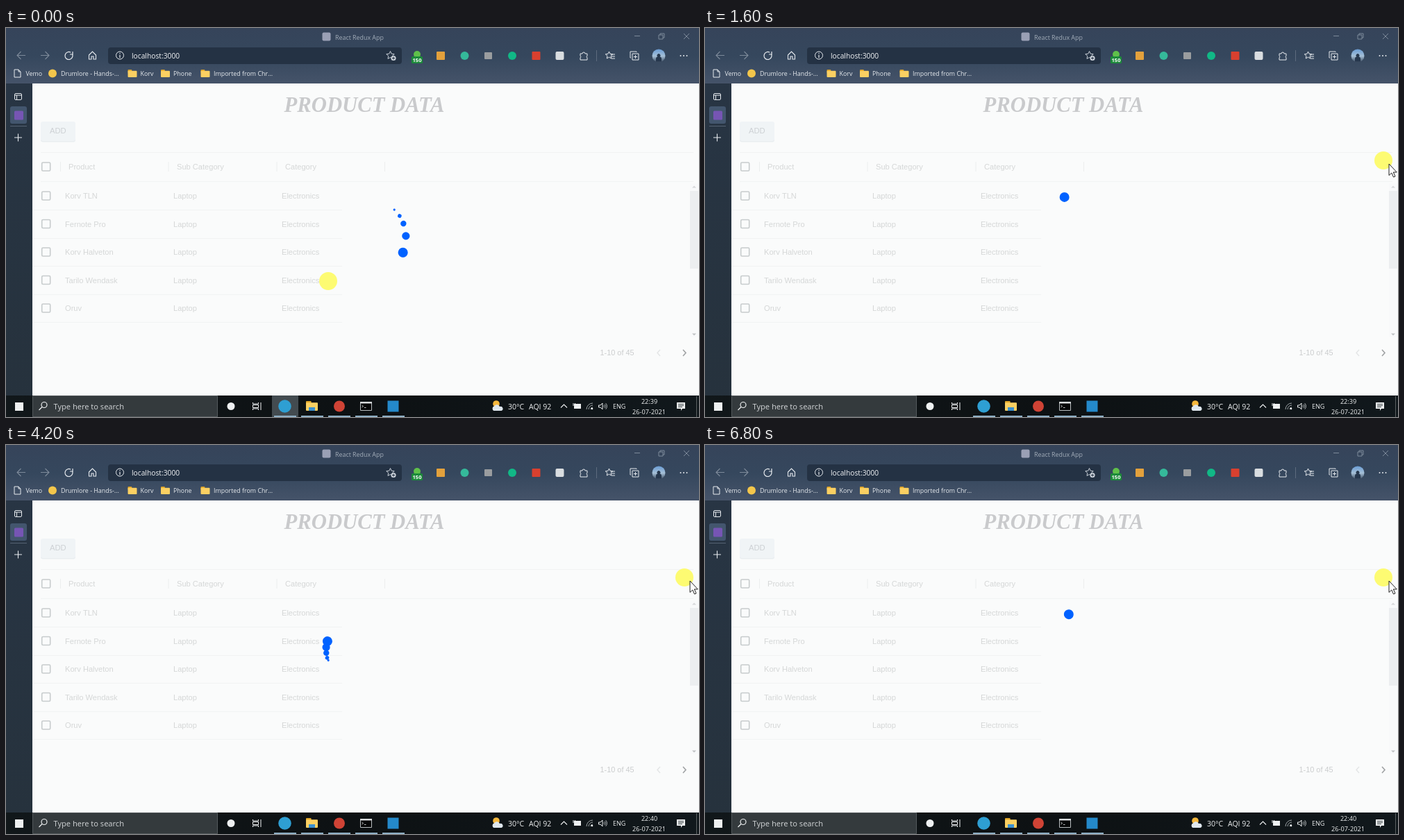
An HTML page with a canvas for the animation above (7000 ms loop, 998 by 561 pixels).

```html
<!DOCTYPE html>
<html lang="en">
<head>
<meta charset="utf-8">
<title>Product data</title>
<style>
  html, body { margin: 0; width: 100%; height: 100%; overflow: hidden; background: #fafbfc; }
  canvas { display: block; width: 998px; height: 561px; }
</style>
</head>
<body>
<canvas id="stage" width="998" height="561"></canvas>
<script>
const ctx = document.getElementById('stage').getContext('2d');
const LOOP = 7000, STEP = 200, SPIN = 1700;
const UI = '"Open Sans", "Noto Sans", sans-serif';
const SANS = '"Liberation Sans", Arial, sans-serif';
const SERIF = '"Liberation Serif", "Times New Roman", serif';

function rect(x, y, w, h, color, r = 0) {
  ctx.fillStyle = color;
  ctx.beginPath();
  ctx.roundRect(x, y, w, h, r);
  ctx.fill();
}

function frame(x, y, w, h, color, r = 0, width = 1) {
  ctx.strokeStyle = color;
  ctx.lineWidth = width;
  ctx.beginPath();
  ctx.roundRect(x, y, w, h, r);
  ctx.stroke();
}

function dot(x, y, r, color) {
  ctx.fillStyle = color;
  ctx.beginPath();
  ctx.arc(x, y, r, 0, Math.PI * 2);
  ctx.fill();
}

function arc(x, y, r, color, from = 0, to = Math.PI * 2, width = 1) {
  ctx.strokeStyle = color;
  ctx.lineWidth = width;
  ctx.beginPath();
  ctx.arc(x, y, r, from, to);
  ctx.stroke();
}

// Path strings are relative to (x, y).
function path(x, y, d, { stroke, fill, width = 1 } = {}) {
  ctx.save();
  ctx.translate(x, y);
  const p = new Path2D(d);
  if (fill) { ctx.fillStyle = fill; ctx.fill(p); }
  if (stroke) { ctx.strokeStyle = stroke; ctx.lineWidth = width; ctx.stroke(p); }
  ctx.restore();
}

function text(str, x, y, size, color, { font = UI, style = '', align = 'left' } = {}) {
  ctx.font = `${style} ${size}px ${font}`;
  ctx.fillStyle = color;
  ctx.textAlign = align;
  ctx.fillText(str, x, y);
}

function gradient(x0, y0, x1, y1, ...colors) {
  const g = ctx.createLinearGradient(x0, y0, x1, y1);
  colors.forEach((c, i) => g.addColorStop(i / (colors.length - 1), c));
  return g;
}

function folder(x, y, w, h) {
  rect(x, y, w * 0.45, h * 0.4, '#e0a526', 1);
  rect(x, y + h * 0.16, w, h * 0.84, '#fbd062', 1);
}

function star(x, y, r, color) {
  ctx.beginPath();
  for (let i = 0; i < 10; i++) {
    const a = i * Math.PI / 5, d = i % 2 ? r * 0.48 : r;
    ctx.lineTo(x + d * Math.sin(a), y - d * Math.cos(a));
  }
  ctx.closePath();
  ctx.strokeStyle = color;
  ctx.lineWidth = 1;
  ctx.stroke();
}

function drawBrowser() {
  const ink = '#e6eaee', dim = '#7d8a9a';
  rect(0, 0, 998, 80, gradient(0, 0, 0, 80, '#36445a', '#35475d', '#455369'));

  rect(455.5, 6.5, 12, 12, '#9aa0b5', 2);
  text('React Redux App', 474, 17, 8.9, '#a3adb9');
  path(905, 11.5, 'M0 0H8', { stroke: dim });
  path(940, 8, 'M0 2H6V8H0ZM2 2V0H8V6H6', { stroke: dim });
  path(976, 8, 'M0 0L8 8M8 0L0 8', { stroke: dim });

  path(16, 39.5, 'M12 0H0M5.5-5.5L0 0L5.5 5.5', { stroke: dim, width: 1.1 });
  path(50, 39.5, 'M0 0H12M6.5-5.5L12 0L6.5 5.5', { stroke: dim, width: 1.1 });
  arc(90.5, 40, 5.5, ink, -0.4, 5.2, 1.2);
  path(96, 34, 'M0 0V4H-4', { stroke: ink, width: 1.2 });
  path(119.5, 34, 'M0 5L5 0L10 5V11H6.5V7H3.5V11H0Z', { stroke: ink, width: 1.1 });

  rect(147, 28, 423, 24, '#243244', 4);
  arc(164, 39.5, 5.5, ink);
  path(164, 36, 'M0 0V1.2M0 2.8V7', { stroke: ink, width: 1.2 });
  text('localhost:3000', 181, 43.5, 10.25, '#f2f4f6');
  star(553.5, 39.5, 6, '#c9d0d8');
  dot(558, 43.5, 3.6, '#c9d0d8');
  path(558, 43.5, 'M-2 0H2M0-2V2', { stroke: '#243244' });

  dot(592, 38, 5, '#5fc04a');
  rect(584, 41, 16, 10, '#1c8a3a', 1.5);
  text('150', 592, 49.3, 7.5, '#fff', { style: 'bold', align: 'center' });
  rect(620, 34, 12, 12, '#e3a13c', 1);
  dot(660.5, 40, 6, '#35b99a');
  rect(689, 35, 11, 10, '#9a9d9f', 1);
  dot(729, 40, 6, '#11b886');
  rect(757.5, 34, 12, 12, '#d8402f', 1);
  rect(791.5, 34, 12, 12, '#d9dde0', 2);
  path(827, 35, 'M0 2H3A2 2 0 0 1 7 2H10V5A2 2 0 0 0 10 8V11H0V8A2 2 0 0 0 0 5Z', { stroke: ink });
  path(850.5, 32, 'M0 0V16', { stroke: '#5d6b7e' });
  star(868.5, 39.5, 5.5, ink);
  path(871, 38, 'M0 0H6M1 3H6M1 6H6', { stroke: ink });
  path(899, 34, 'M3 3H12V12H3ZM1 9H0V0H9V1M7.5 5V10M5 7.5H10', { stroke: ink });

  dot(940, 40, 9.5, gradient(0, 31, 0, 50, '#6d9fd5', '#a5bfd6', '#344357'));
  path(940, 48.5, 'M-4 0V-4Q-4-7-1.5-7A2.4 2.4 0 1 1 1.5-7Q4-7 4-4V0Z', { fill: '#26374d' });
  [971.5, 976, 980.5].forEach(x => dot(x, 40, 1, ink));

  path(12, 60, 'M0 0H6L9 3V11H0ZM6 0V3H9', { stroke: ink });
  text('Vemo', 28.5, 69, 8.9, ink);
  dot(67, 65.5, 6, '#f3c64b');
  text('Drumlore - Hands-...', 79, 69, 8.9, ink);
  folder(175.5, 60, 13, 11);
  text('Korv', 193.5, 69, 8.9, ink);
  folder(223, 60, 13, 11);
  text('Phone', 241, 69, 8.9, ink);
  folder(280.5, 60, 13, 11);
  text('Imported from Chr...', 299, 69, 8.9, ink);

  rect(0, 80, 38, 450, gradient(0, 80, 0, 530, '#283544', '#26323d'));
  frame(12.5, 94.5, 10, 9, ink, 1.5);
  path(12.5, 97, 'M0 0H10M3 0V6.5', { stroke: ink });
  rect(6, 113, 24, 25, '#43566e', 3);
  rect(12, 119.5, 13, 13, '#7655b4', 1.5);
  path(6, 141.5, 'M0 0H24', { stroke: '#566373' });
  path(17.5, 158, 'M-5.5 0H5.5M0-5.5V5.5', { stroke: ink, width: 1.1 });
}

function drawPage() {
  const ink = '#d5d7d7', line = '#f1f3f3';
  rect(38, 80, 960, 450, '#fafbfb');
  text('PRODUCT DATA', 400.5, 121.3, 30.7, '#c9cacc', { font: SERIF, style: 'italic bold' });

  rect(50, 136, 50, 28.5, '#e9edf0', 3);
  rect(50, 135, 50, 28, '#f0f4f6', 3);
  text('ADD', 63, 152, 11.2, '#cdd1d4', { font: SANS });

  const cell = (str, x, y) => text(str, x, y + 4, 11.1, ink, { font: SANS });
  const box = y => frame(51.7, y - 6, 12, 12, '#c7cccd', 1.5, 1.6);
  path(50, 179.5, 'M0 0H940M0 42H940', { stroke: line });
  box(200);
  ['Product', 'Sub Category', 'Category'].forEach((name, i) => cell(name, 90 + i * 156, 200));
  [78.5, 234, 390, 545.5].forEach(x => path(x, 193, 'M0 0V14', { stroke: '#eceeee' }));

  ['Korv TLN', 'Fernote Pro', 'Korv Halveton', 'Tarilo Wendask', 'Oruv'].forEach((name, i) => {
    const y = 242 + i * 40.5;
    box(y);
    cell(name, 85, y);
    cell('Laptop', 241, y);
    cell('Electronics', 397, y);
    path(38, Math.round(y + 20) + 0.5, 'M0 0H446', { stroke: line });
  });

  rect(985, 224, 12, 222, '#f8f9fa');
  rect(985, 235, 12, 112, '#eceef0');
  path(991, 229, 'M-3 1.5L0-1.5L3 1.5Z', { fill: '#d5d7d9' });
  path(991, 442, 'M-3-1.5L0 1.5L3-1.5Z', { fill: '#bfc1c3' });

  text('1-10 of 45', 855.5, 472, 10.9, '#cbcdce', { font: SANS });
  path(942, 464, 'M0 0L-4 4.5L0 9', { stroke: '#e3e5e6', width: 1.4 });
  path(975, 464, 'M0 0L4 4.5L0 9', { stroke: '#9fa2a4', width: 1.6 });
}

function drawTaskbar(t) {
  const ink = '#eef0f1';
  rect(0, 530, 998, 31, gradient(0, 0, 998, 0, '#11171a', '#0d1113', '#11181c'));
  rect(13, 540, 12, 12, ink);
  rect(38, 530, 267, 31, '#343a3d');
  frame(38.5, 530.5, 266, 30, '#53595c');
  arc(55, 543.5, 4, ink, 0, Math.PI * 2, 1.2);
  path(52, 546.5, 'M0 0L-4.5 4.5', { stroke: ink, width: 1.2 });
  text('Type here to search', 68.5, 550, 11.1, '#d3d6d8');
  dot(324, 545.5, 5.5, ink);
  path(355.5, 540, 'M0 0V2H8V0M0 11V9H8V11M0 3.5H8V7.5H0ZM11.5 0V11', { stroke: ink });

  if (t < STEP) rect(383, 530, 38, 31, '#434b50');
  for (let i = 0; i < 5; i++) rect(386 + i * 39, 559, 32, 2, '#8fb0c6');
  dot(401.5, 545.5, 9.3, '#2e9fd3');
  folder(432, 538, 17, 14);
  rect(436, 547, 9, 5, '#3c91d0');
  dot(480, 545.5, 8, '#cf4335');
  rect(510, 539, 17, 13, '#050607');
  frame(510.5, 539.5, 16, 12, '#b9bec0');
  rect(510, 539, 17, 2.5, '#d8dbdc');
  path(512.5, 544, 'M0 0L2 1.5L0 3M3.5 3.5H6', { stroke: ink, width: 0.8 });
  rect(549.5, 537.5, 16, 16, '#2489ca');

  dot(706, 542, 4.8, '#f6b83d');
  path(700, 552, 'M2.5 0A3.5 3.5 0 0 1 3-6.5A4.5 4.5 0 0 1 11-6A3.2 3.2 0 0 1 13.5 0Z', { fill: '#dfe7ee' });
  text('30°C', 723, 550, 10.5, ink);
  text('AQI 92', 753, 550, 10.5, ink);
  path(799, 547.5, 'M0 0L4.5-4.5L9 0', { stroke: ink, width: 1.1 });
  rect(818, 542, 10, 7, ink);
  path(817, 541, 'M0 0V4M2.5 0V4', { stroke: ink });
  [3, 6, 9].forEach(r => arc(845, 550, r, '#9ea4a7', Math.PI, Math.PI * 1.5));
  dot(844, 549, 1.3, ink);
  path(853.5, 545.5, 'M0-1.5H2.5L5.5-4.5V4.5L2.5 1.5H0Z', { stroke: ink });
  [2, 4, 6].forEach(r => arc(859.5, 545.5, r, '#aeb3b5', -0.8, 0.8));
  text('ENG', 874, 549, 9, ink);
  text(t < 4000 ? '22:39' : '22:40', 926.5, 542, 9.1, ink, { align: 'center' });
  text('26-07-2021', 926, 556.5, 9.2, ink, { align: 'center' });
  path(966, 540, 'M0 0H12V9H8L6 12V9H0Z', { fill: ink });
  path(968, 542.5, 'M0 0H8M0 2H8M0 4H6', { stroke: '#20272b', width: 0.8 });
  path(994.5, 531, 'M0 0V30', { stroke: '#5c6163' });
}

// CSS "ease": cubic-bezier(.25, .1, .25, 1)
function ease(x) {
  let lo = 0, hi = 1;
  for (let i = 0; i < 24; i++) {
    const s = (lo + hi) / 2;
    if (0.75 * s - 0.75 * s * s + s ** 3 < x) lo = s; else hi = s;
  }
  return 0.3 * lo + 2.4 * lo * lo - 1.7 * lo ** 3;
}

const mix = (a, b, k) => a + (b - a) * k;

// Tail dot positions in em, for the folded, short, long and full tail.
const FOLDED = Array.from({ length: 4 }, () => [0, -0.83]);
const SHORT = [[-0.087, -0.825], [-0.173, -0.812], [-0.256, -0.789], [-0.297, -0.775]];
const LONG = [[-0.338, -0.758], [-0.555, -0.617], [-0.671, -0.488], [-0.749, -0.34]];
const FULL = [[-0.377, -0.74], [-0.645, -0.522], [-0.775, -0.297], [-0.82, -0.09]];
const TAIL = [[0, FOLDED], [0.05, FOLDED], [0.1, SHORT], [0.2, LONG], [0.38, FULL],
  [0.59, SHORT], [0.95, FOLDED], [1, FOLDED]];
const TAIL_RADII = [0.08, 0.06, 0.04, 0.023];

function drawSpinner(t) {
  const em = 70, color = '#0062ff';
  const turns = t < 600 ? mix(0.207, 0.383, t / 600) : 0.383 + (t - 600) / SPIN;
  const phase = turns % 1;
  const next = TAIL.findIndex(([at]) => at > phase);
  const [t0, from] = TAIL[next - 1], [t1, to] = TAIL[next];
  const k = ease((phase - t0) / (t1 - t0));
  ctx.save();
  ctx.translate(517.8, 302);
  ctx.rotate(ease(phase) * Math.PI * 2);
  ctx.scale(em, em);
  dot(0, -0.83, 0.1, color);
  TAIL_RADII.forEach((r, i) =>
    dot(mix(from[i][0], to[i][0], k), mix(from[i][1], to[i][1], k), r, color));
  ctx.restore();
}

function drawPointer(t) {
  let x, y;
  if (t < 600) {
    x = mix(464, 492, t / 600);
    y = mix(365, 382, t / 600);
  } else {
    const k = Math.min(1, (t - 600) / 1000), s = k * k * (3 - 2 * k);
    x = mix(492, 977, s);
    y = mix(382, 191, s);
  }
  dot(x, y, 13, '#fdfb72');
  if (t >= STEP) {
    path(x + 8, y + 5, 'M0 0V16.5L3.8 13L6.5 19L9 18L6.3 12H11.3Z', { fill: '#fff', stroke: '#222' });
  }
}

let shown = -1;
function tick(now) {
  const t = Math.floor((now % LOOP) / STEP) * STEP;
  if (t !== shown) {
    shown = t;
    drawPage();
    drawBrowser();
    drawTaskbar(t);
    drawSpinner(t);
    drawPointer(t);
  }
  requestAnimationFrame(tick);
}
tick(performance.now());
</script>
</body>
</html>
```
